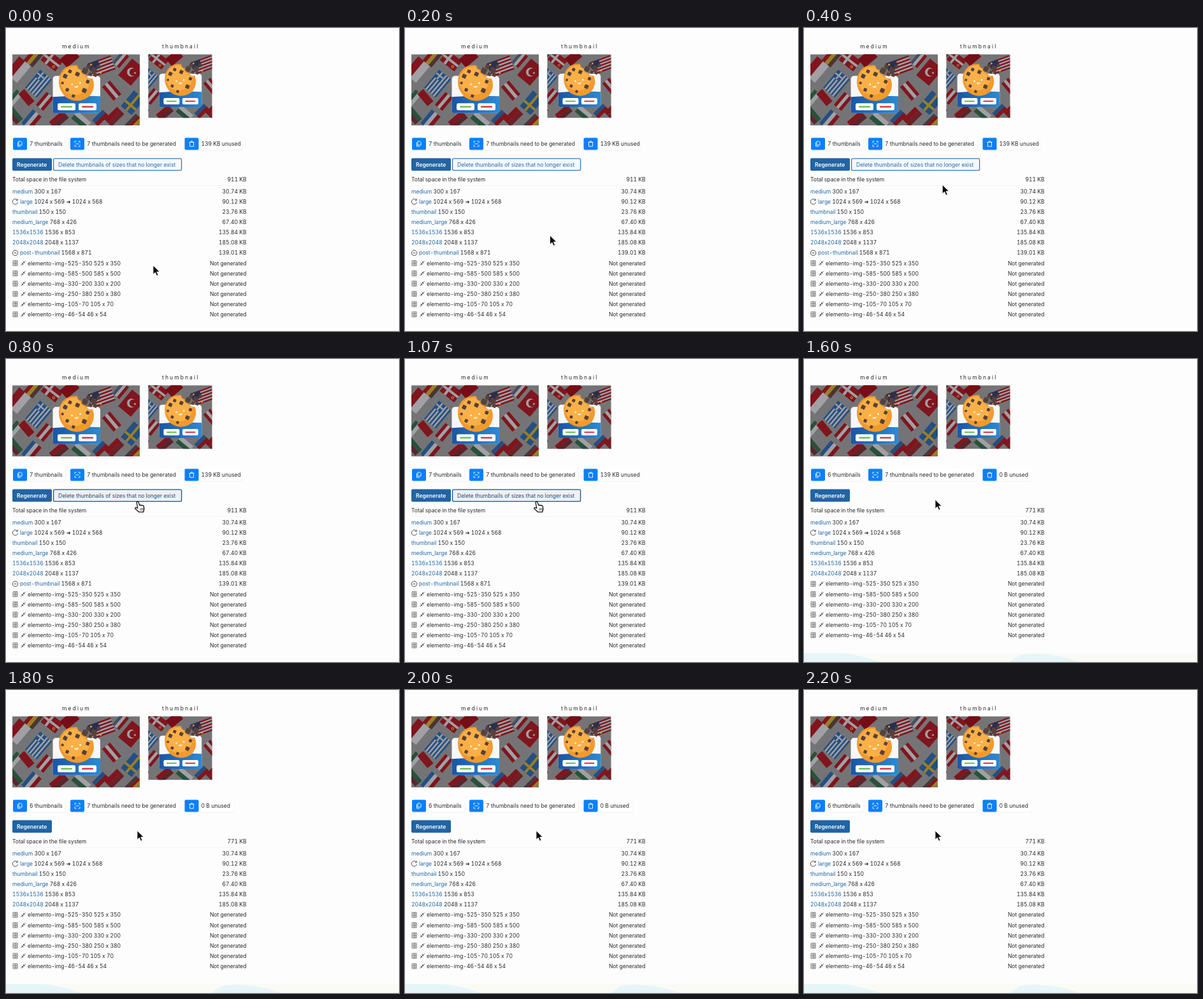
Write an HTML page that moves like this. It is 617 px wide and 476 px high and loops after 2270 ms.

```html
<!DOCTYPE html>
<html lang="en">
<head>
<meta charset="utf-8">
<title>Thumbnail manager</title>
<style>
html, body { margin: 0; width: 100%; height: 100%; overflow: hidden; background: #fdfdfd; }
svg { display: block; width: 617px; height: 476px; }
text { font: 8.5px Inter, "Open Sans", sans-serif; font-variant-numeric: tabular-nums; fill: #24272b; white-space: pre; }
.link { fill: #2168a8; }
.title { letter-spacing: 2.1px; }
.bold { font-weight: 600; fill: #fff; }
.end { text-anchor: end; }
.line { fill: none; stroke: #222; stroke-width: .8; }
.thin { fill: none; stroke: #333; stroke-width: .6; }
.white { fill: none; stroke: #fff; stroke-width: .9; }
#button rect { fill: #f4f7fb; stroke: #3a7db8; stroke-width: 1.3; }
#button text { fill: #2a6da8; }
#button.hover rect { fill: #eff0f3; stroke: #1c5583; }
#button.hover text { fill: #1b4a74; }
</style>
</head>
<body>
<svg id="stage" viewBox="0 0 617 476"></svg>
<script>
const LOOP = 2270, STEP = 1000 / 15, ARRIVE = 540, SWAP = 1330, FADE = 200;

const rect = (x, y, w, h, fill, r = 0) =>
  `<rect x="${x}" y="${y}" width="${w}" height="${h}" rx="${r}" fill="${fill}"/>`;
const circle = (x, y, r, fill) => `<circle cx="${x}" cy="${y}" r="${r}" fill="${fill}"/>`;
const path = (d, attrs) => `<path d="${d}" ${attrs}/>`;
const text = (x, y, s, cls = "") => `<text x="${x}" y="${y}" class="${cls}">${s}</text>`;
const at = (x, y, s, more = "") => `<g transform="translate(${x} ${y}) ${more}">${s}</g>`;

// A striped flag centred on x, y; extra is drawn on top
function flag(x, y, w, h, angle, colors, extra = "") {
  const s = h / colors.length;
  const stripes = colors.map((c, i) => rect(-w / 2, -h / 2 + i * s, w, s + .1, c)).join("");
  return at(x, y, stripes + extra, `rotate(${angle})`);
}
const cross = (w, h, color) => rect(-w / 2, -2, w, 4, color) + rect(-w / 6 - 2, -h / 2, 4, h, color);
const alternate = (n, a, b) => Array.from({ length: n }, (_, i) => i % 2 ? b : a);

const RED = "#80151d", PALE = "#a0a0a5", BLUE = "#234f83", GOLD = "#9c7f25", GREEN = "#28513a";

function picture() {
  const flags =
    flag(9, 24, 34, 24, -50, [RED, PALE]) +
    flag(33, 5, 26, 18, -50, [RED, GOLD, "#4b3433"]) +
    flag(62, 10, 29, 20, 38, [RED], cross(29, 20, PALE)) +
    flag(90, 6, 26, 17, -40, ["#770d16"]) +
    flag(41, 46, 37, 24, -50, alternate(9, BLUE, PALE), rect(5, -12, 13.5, 13.3, BLUE) +
      rect(5, -6.5, 13.5, 2.5, PALE) + rect(10.5, -12, 2.5, 13.3, PALE)) +
    flag(140, 19, 38, 23, -20, alternate(9, RED, PALE), rect(-19, -11.5, 17, 13, "#29304f")) +
    flag(170, 8, 24, 14, -50, ["#484e61", PALE, RED]) +
    flag(187, 28, 34, 26, -50, [RED], circle(0, 0, 7, PALE) + circle(1.5, 2, 5.7, RED) + circle(2.5, 5, 1.5, PALE)) +
    flag(189, 76, 32, 22, -50, [BLUE], cross(32, 22, GOLD)) +
    flag(156, 57, 28, 16, 50, [RED, PALE, RED]) +
    flag(160, 98, 28, 16, -45, [RED, "#6d2026"]) +
    flag(190, 107, 25, 14, -45, ["#45383a", RED, GOLD]) +
    flag(3, 69, 26, 12, -50, [GREEN, PALE]) +
    flag(22, 68, 25, 12, 50, [RED]) +
    flag(51, 74, 26, 15, -50, [RED, PALE, RED]) +
    flag(3, 96, 26, 14, 50, [GREEN, "#5b2530"]) +
    flag(30, 103, 28, 18, -50, [BLUE, PALE, RED]) +
    flag(73, 103, 28, 15, -40, [RED, "#59242b"]) +
    flag(108, 104, 28, 15, 40, [PALE, GREEN]) +
    flag(138, 100, 24, 13, -45, [BLUE, RED]);

  const card =
    rect(63.5, 34, 74.5, 58.5, "#f7f8fc", 5) +
    path("M63.5 67q37-3 74.500-1v22q0 4.500-4.500 4.500h-65.500q-4.500 0-4.500-4.500z", 'fill="url(#base)"') +
    rect(71, 77, 28, 11, "#fff", 2.5) + rect(104, 77, 28, 11, "#fff", 2.5) +
    rect(76, 81.3, 18, 2.3, "#6cc052", 1) + rect(109, 81.3, 18, 2.3, "#d43d45", 1);

  const chips = [[85, 34, 3], [92, 27, 2.5], [103, 31, 3], [113, 55, 3.2], [88, 54, 2.4], [118, 42, 2.5], [97, 63, 2.2], [81, 44, 1.8]];
  const crumbs = [[114, 26, 4], [119, 20, 3], [127, 25, 4], [129, 32, 2.7], [134, 20, 2.5], [122, 31, 2.5]];
  const chunk = ([x, y, r]) => at(x, y, rect(-r, -r, 2 * r, 2 * r, "#57413c", r / 3), "rotate(25)");
  const cookie =
    path("M103 18q-19-2-26 15q-5 19 9 32q17 11 34-1q11-13 5-27q-7 2-9-5q-7 0-7-7q-6-1-6-7z", 'fill="#f39a2c"') +
    path("M102 20q-17-1-23 14q-3 15 7 24q16 8 29-3q8-10 6-18q-7 0-8-5q-6-1-6-7q-5-1-5-5z", 'fill="#fbb047"') +
    chips.map(chunk).join("") + crumbs.map(chunk).join("") +
    circle(95, 46, 1.3, "#fff") + circle(107, 44, 1.3, "#fff") +
    path("M98 49q4 5 7-1z", 'fill="#fff2dd"') +
    circle(137, 29, 1.5, "#e99a35") + circle(123, 17, 1.5, "#e99a35") +
    `<circle cx="68" cy="20" r="1.6" fill="none" stroke="#d08a36"/>`;

  return rect(0, 0, 200, 112, "#747476") + flags + card + at(-8, -2, cookie, "scale(1.07)");
}

const icons = {
  copy: path("M-2-4h3.500l1.500 1.500v4.500h-5zM-3.500-2.500v6.500h4.500", 'class="white"'),
  scan: path("M-4-1.500v-2.500h2.500M1.500-4h2.500v2.500M4 1.500v2.500h-2.500M-1.500 4h-2.500v-2.500M-2.500 0h5", 'class="white"'),
  bin: path("M-4-2.500h8M-1.500-2.500v-1.500h3v1.500M-3-2.500v6.500h6v-6.500", 'class="white"'),
  reload: path("M3.300-2.500a4.200 4.200 0 1 0 .8 3.500M3.700-4.500v2.500h-2.500", 'class="line"'),
  minus: path("M-4.200 0a4.200 4.200 0 1 0 8.400 0a4.200 4.200 0 1 0-8.400 0M-2 0h4", 'class="line"'),
  missing: path("M-3.500-4h7v8h-7zM-3.500-1.300h7M-3.500 1.300h7M-1.500-2.700h3.500M-1.500 0h3.500M-1.500 2.700h3.500", 'class="thin"') +
    at(12.500, 0, path("M3.500-3.500l-3 3v-2M.5-.5h2M-3.500 3.500l3-3v2M-.5.5h-2", 'class="line"'))
};

const badge = (x, w, icon, label) =>
  rect(x + .5, 173.5, w, 19, "#f3edf5", 3) + rect(x, 172.5, w, 19, "#fff", 3) +
  rect(x, 172.5, 22, 19, "#0b80fb", 2) + at(x + 11, 182, icons[icon]) + text(x + 26, 185.3, label);

const sizes = [
  ["medium", "300 x 167", "30.74"],
  ["large", "1024 x 569 ➜ 1024 x 568", "90.12", "reload"],
  ["thumbnail", "150 x 150", "23.76"],
  ["medium_large", "768 x 426", "67.40"],
  ["1536x1536", "1536 x 853", "135.84"],
  ["2048x2048", "2048 x 1137", "185.08"],
  ["post-thumbnail", "1568 x 871", "139.01", "minus"]
];
const missing = [[525, 350], [585, 500], [330, 200], [250, 380], [105, 70], [46, 54]];

function page(cleaned) {
  const kept = cleaned ? sizes.slice(0, 6) : sizes;
  const rowY = i => 256.7 + i * 16.1;
  const rows = kept.map(([name, size, kb, icon], i) => {
    const y = rowY(i);
    return (icon ? at(14.5, y, icons[icon]) : "") +
      text(icon ? 22 : 10, y + 3.1, `<tspan class="link">${name}</tspan> ${size}`) +
      text(377.5, y + 3.1, kb + " KB", "end");
  }).join("") + missing.map(([w, h], i) => {
    const y = rowY(kept.length + i);
    return at(14.5, y, icons.missing) +
      text(34, y + 3.1, `elemento-img-${w}-${h} ${w} x ${h}`) +
      text(377.5, y + 3.1, "Not generated", "end");
  }).join("");

  return text(88, 32, "medium", "title") + text(245, 32, "thumbnail", "title") +
    `<g clip-path="url(#wide)"><use href="#pic" x="10" y="41.300"/></g>` +
    `<g clip-path="url(#square)"><use href="#pic" transform="translate(184 41.300) scale(.893)"/></g>` +
    badge(11, 82, "copy", `${cleaned ? 6 : 7} thumbnails`) +
    badge(101, 171, "scan", "7 thumbnails need to be generated") +
    badge(280.5, cleaned ? 77 : 90, "bin", cleaned ? "0 B unused" : "139 KB unused") +
    rect(10, 204.5, 62, 19.7, "#2164a4", 2) + text(17, 217.5, "Regenerate", "bold") +
    (cleaned ? "" : `<g id="button">${rect(74.6, 205.2, 201, 18.5, "", 2)}` +
      text(82, 217.5, "Delete thumbnails of sizes that no longer exist") + "</g>") +
    text(10, 240.8, "Total space in the file system") +
    text(377.5, 240.8, cleaned ? "771 KB" : "911 KB", "end") +
    rect(10, 247, 367, .7, "#f3f3f5") + rows;
}

document.getElementById("stage").innerHTML =
  `<defs>
    <linearGradient id="base"><stop stop-color="#1b55a4"/><stop offset="1" stop-color="#2b8ad4"/></linearGradient>
    <clipPath id="wide">${rect(10, 41.3, 200, 111.7, "")}</clipPath>
    <clipPath id="square">${rect(223.5, 41.3, 100, 100, "")}</clipPath>
    <g id="pic">${picture()}</g>
  </defs>
  <g id="before">${page(false)}</g>
  <g id="after">${page(true)}</g>
  <g id="footer">${rect(0, 462, 617, 14, "#fbfbf5")}
    ${path("M0 462h60q25 2 60 14h-120zM338 465q20-4 50 0q25 3 45 11h-110z", 'fill="#e6f6f8"')}</g>
  <g id="arrow">${path("M0 0v14l3.300-3 2.400 5.300 2.300-1-2.300-5.200h4.500z", 'fill="#050505" stroke="#fff" stroke-width=".8"')}</g>
  <g id="hand">${path("M-1 1.500q1.500-2.500 3 0l1.800 5q1.200-1.500 2.300.1q1.300-1.200 2.200.3q1.500-.8 2 1l.5 4.500-1 4.500h-7l-6-5.500q-.5-2 2-1.400l2 1z", 'fill="#fff" stroke="#111" stroke-width="1.300" stroke-linejoin="round"')}
    ${path("M5 11v3.500M7 10.500v4M9 10.500v4", 'class="line"')}</g>`;

const [before, after, footer, arrow, hand, button] =
  ["before", "after", "footer", "arrow", "hand", "button"].map(id => document.getElementById(id));
const show = (el, on) => el.style.display = on ? "" : "none";
const clamp = v => Math.max(0, Math.min(1, v));

function draw(now) {
  const t = Math.floor((now % LOOP + 5) / STEP) * STEP;
  const p = clamp(t / ARRIVE);
  const x = 231 - 25 * p * p, y = 373 - 152 * p * p * (3 - 2 * p);
  const cleaned = t >= SWAP, hover = !cleaned && y < 224;

  show(before, !cleaned);
  show(after, cleaned);
  show(footer, cleaned);
  show(arrow, !hover);
  show(hand, hover);
  after.style.opacity = .62 + .38 * clamp((t - SWAP) / FADE);
  button.classList.toggle("hover", hover);
  for (const el of [arrow, hand]) el.setAttribute("transform", `translate(${x} ${y + (hover ? 2.5 : 0)})`);
  requestAnimationFrame(draw);
}
requestAnimationFrame(draw);
</script>
</body>
</html>
```
